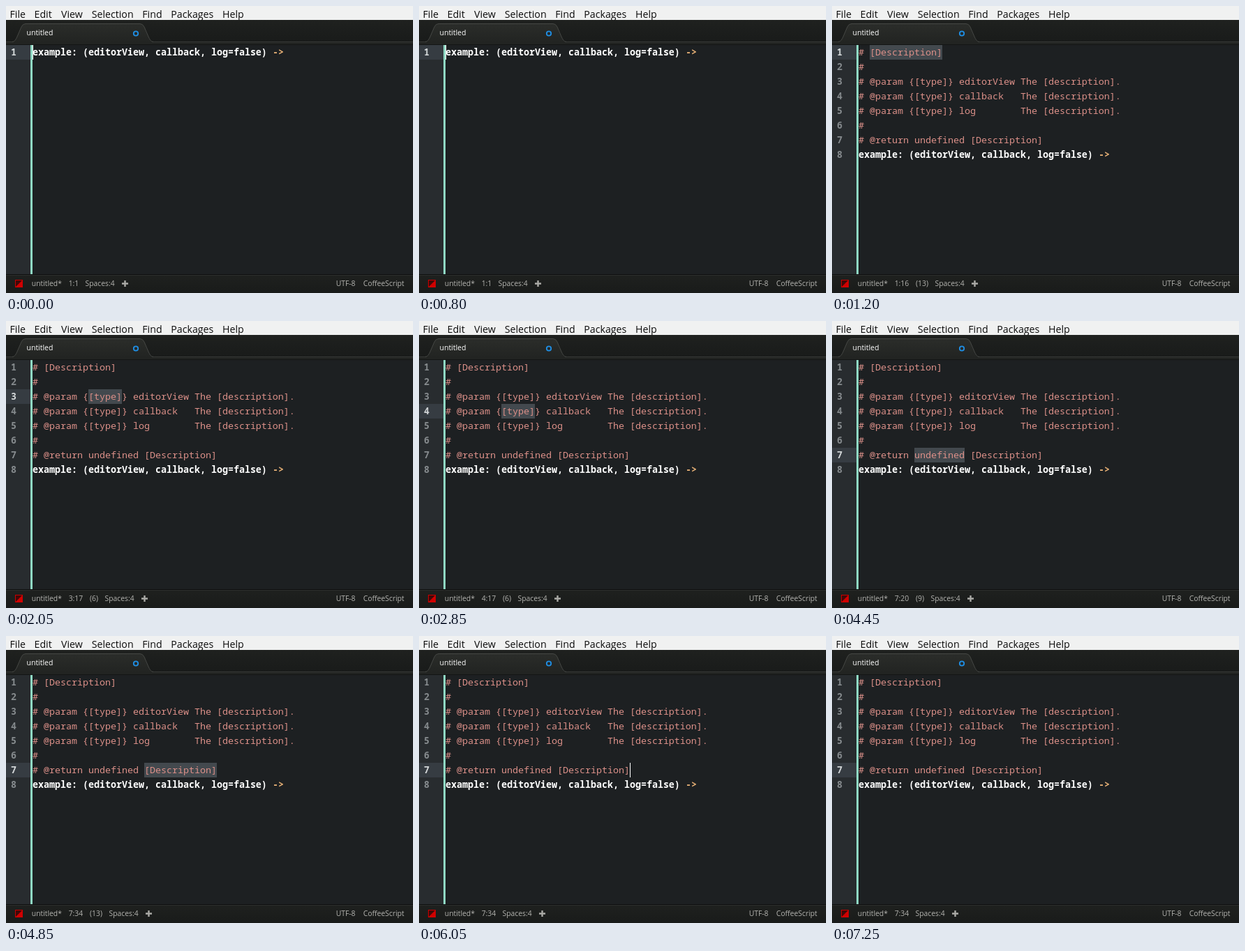
An HTML page for the animation above (7.65 s loop, 583 px wide and 412 px high).

```html
<!DOCTYPE html>
<html lang="en">
<head>
<meta charset="utf-8">
<title>Doc comment snippet</title>
<style>
  html, body { margin: 0; width: 100%; height: 100%; overflow: hidden; background: #1d2022; }
  svg { display: block; width: 583px; height: 412px; }
  text { white-space: pre; font-family: "Open Sans", "Noto Sans", sans-serif; }
  .menu text { font-size: 14.2px; fill: #0c0c0c; }
  .tab { font-size: 10.5px; fill: #fff; }
  .status text { font-size: 10.35px; fill: #b4b4b0; }
  .code text { font: 500 13.333px "Noto Sans Mono", "DejaVu Sans Mono", monospace; }
  .code .number { font-weight: 600; fill: #858a8d; }
  .code .number.active { fill: #d2d6d8; }
  .code .comment { fill: #dc9089; }
  .code .source { font-weight: 600; fill: #fff; }
</style>
</head>
<body>
<svg viewBox="0 0 583 412">
  <defs>
    <linearGradient id="barFill" x2="0" y2="1">
      <stop offset="0" stop-color="#1f211f"/><stop offset="1" stop-color="#191b1a"/>
    </linearGradient>
    <linearGradient id="tabFill" x2="0" y2="1">
      <stop offset="0" stop-color="#2b2d2a"/><stop offset="1" stop-color="#222422"/>
    </linearGradient>
  </defs>

  <rect width="583" height="412" fill="#1d2022"/>
  <rect width="583" height="20" fill="#f0f1f1"/>
  <g class="menu" id="menu"></g>

  <rect y="20" width="583" height="32" fill="url(#barFill)"/>
  <rect y="51" width="583" height="4" fill="#222422"/>
  <path d="M0 51.5H583" stroke="#383a38"/>
  <path d="M9 52C13 51 14 48 16 44L22 30Q24 25.5 28 25.5H192Q196 25.5 198 30L204 44C206 48 207 51 211 52Z" fill="url(#tabFill)"/>
  <path d="M9 51.5C13 51 14 48 16 44L22 30Q24 25.5 28 25.5H192Q196 25.5 198 30L204 44C206 48 207 51 211 51.5" fill="none" stroke="#454744"/>
  <path d="M0 55.5H583" stroke="#131514"/>
  <text class="tab" x="29.5" y="42">untitled</text>
  <circle cx="186" cy="39.5" r="3.2" fill="none" stroke="#1f8fe6" stroke-width="1.8"/>

  <rect y="56" width="35" height="329" fill="#282c2f"/>
  <rect id="activeGutter" width="35" height="21" fill="#363c42"/>
  <rect x="35" y="56" width="3" height="329" fill="#8fd8c3"/>
  <rect id="selection" height="21" fill="#43494e"/>
  <g class="code" id="code"></g>
  <rect id="cursor" width="1" height="21" fill="#fff"/>

  <rect y="385" width="583" height="27" fill="url(#barFill)"/>
  <path d="M0 385.5H583" stroke="#0d0e0e"/>
  <path d="M0 386.5H583" stroke="#2d2f2d"/>
  <rect x="13.5" y="393.5" width="10" height="10" fill="#400808" stroke="#c80000"/>
  <path d="M24 393V404H13Z" fill="#d00000"/>
  <g class="status">
    <text x="36.8" y="402">untitled*</text>
    <text id="position" x="89.7" y="402"></text>
    <text id="count" x="120" y="402"></text>
    <text id="spaces" y="402">Spaces:4</text>
    <path id="plus" d="M-4.5 0H4.5M0 -4.5V4.5" stroke="#aaaaa6" stroke-width="2.4"/>
    <text x="472.7" y="402">UTF-8</text>
    <text x="511.7" y="402">CoffeeScript</text>
  </g>
</svg>
<script>
const LOOP = 7650, BLINK = 400, LEFT = 38, TOP = 56, CHAR = 8, ROW = 21;
const INSERT_AT = 1200, DONE_AT = 5250;

const comments = [
  "# [Description]",
  "#",
  "# @param {[type]} editorView The [description].",
  "# @param {[type]} callback   The [description].",
  "# @param {[type]} log        The [description].",
  "#",
  "# @return undefined [Description]"
];

// Tab stops: start time, row and selected word.
const stops = [
  [1200, 1, "[Description]"],
  [2050, 3, "[type]"],
  [2450, 3, "[description]"],
  [2850, 4, "[type]"],
  [3250, 4, "[description]"],
  [3650, 5, "[type]"],
  [4050, 5, "[description]"],
  [4450, 7, "undefined"],
  [4850, 7, "[Description]"]
];

const $ = id => document.getElementById(id);
const rowTop = row => TOP + (row - 1) * ROW;
const colX = col => LEFT + (col - 1) * CHAR;

function setAttrs(node, attrs) {
  for (const key in attrs) node.setAttribute(key, attrs[key]);
  return node;
}

function addText(parent, x, y, content, className = "") {
  const node = document.createElementNS("http://www.w3.org/2000/svg", "text");
  node.textContent = content;
  return parent.appendChild(setAttrs(node, { x, y, class: className }));
}

const menu = { File: 5.5, Edit: 40.5, View: 79, Selection: 122.7, Find: 195.3, Packages: 236.3, Help: 310 };
for (const label in menu) addText($("menu"), menu[label], 17, label);

const code = $("code");
const baseline = row => rowTop(row) + 15;
const numbers = [1, 2, 3, 4, 5, 6, 7, 8].map(n => addText(code, 7, baseline(n), n, "number"));
const commentRows = comments.map((line, i) => addText(code, LEFT, baseline(i + 1), line, "comment"));
const source = addText(code, LEFT, 0, "example: (editorView, callback, log=false) ", "source");
const arrow = addText(code, colX(44), 0, "->", "source");
arrow.style.fill = "#e9b277";

function show(node, visible) {
  node.setAttribute("visibility", visible ? "visible" : "hidden");
}

function stateAt(time) {
  if (time < INSERT_AT) return { row: 1, col: 1, length: 0, blinkTime: time };
  if (time >= DONE_AT) return { row: 7, col: 34, length: 0, blinkTime: time - DONE_AT };
  const [, row, word] = stops.filter(stop => stop[0] <= time).pop();
  const col = comments[row - 1].indexOf(word) + word.length + 1;
  return { row, col, length: word.length, blinkTime: 0 };
}

function render(time) {
  const { row, col, length, blinkTime } = stateAt(time);
  const inserted = time >= INSERT_AT;
  const y = rowTop(row);

  commentRows.forEach(node => show(node, inserted));
  numbers.forEach((node, i) => {
    show(node, inserted || i === 0);
    node.classList.toggle("active", i + 1 === row);
  });
  for (const node of [source, arrow]) node.setAttribute("y", baseline(inserted ? 8 : 1));

  setAttrs($("activeGutter"), { y });
  setAttrs($("selection"), { x: colX(col - length), y, width: length * CHAR });
  setAttrs($("cursor"), { x: colX(col), y });
  show($("cursor"), !length && Math.floor(blinkTime / BLINK) % 2 === 0);

  const position = `${row}:${col}`;
  const spacesX = 114 + (position.length - 3) * 6 + (length ? 16 + String(length).length * 6 : 0);
  $("position").textContent = position;
  $("count").textContent = length ? `(${length})` : "";
  setAttrs($("spaces"), { x: spacesX - 0.4 });
  setAttrs($("plus"), { transform: `translate(${spacesX + 56.5} 398.5)` });
}

const start = performance.now();
function tick() {
  render((performance.now() - start) % LOOP);
  requestAnimationFrame(tick);
}
tick();
</script>
</body>
</html>
```
